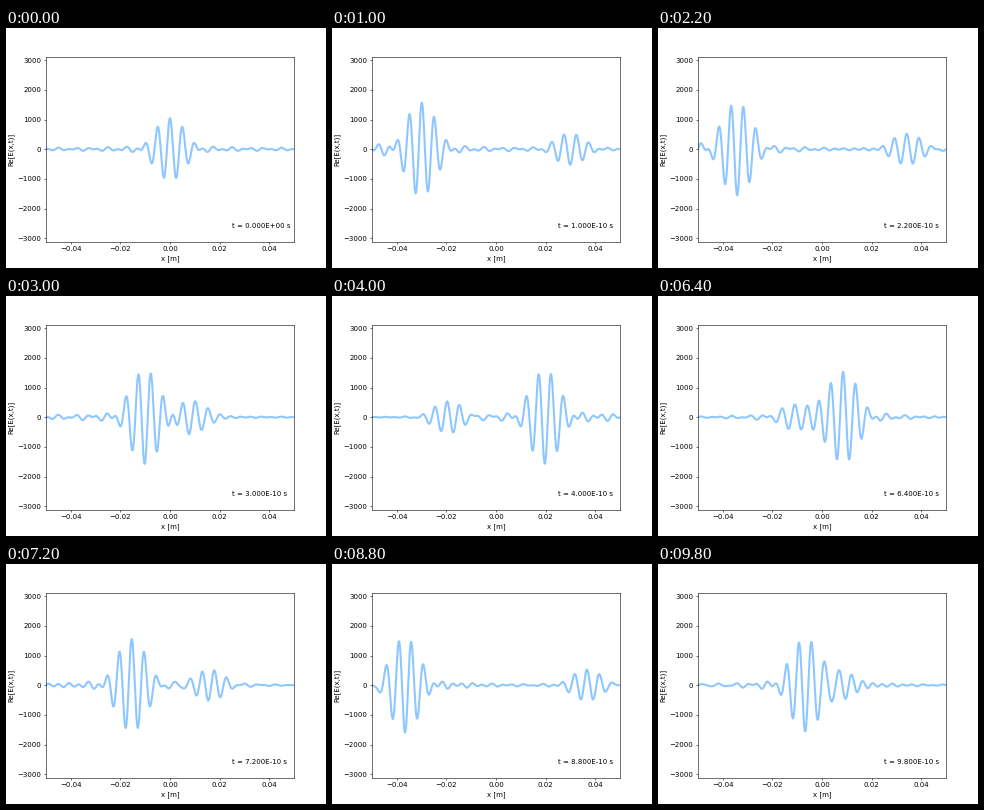
A matplotlib script that plays this animation: 320x240 px, repeating every 10000 ms.

```python
import numpy as np
import matplotlib.pyplot as plt
from matplotlib.animation import FuncAnimation

C = 2.992e8          # wave speed in the cavity, m/s
L = 0.1              # distance between the mirrors, m
N0, WIDTH = 40, 7    # centre and width of the mode spectrum
AMP = 140.4
FRAMES, DT = 50, 2e-11

x = np.linspace(-L / 2, L / 2, 1000)
n = np.arange(N0 - 10, N0 + 11)
k = n * np.pi / L
omega = C * k
weight = AMP * np.exp(-(n - N0) ** 2 / (2 * WIDTH ** 2))
weight[[0, -1]] *= 0.5

# Odd modes are cosines, even modes are sines, so all vanish at the mirrors.
odd = n % 2 == 1
shapes = np.where(odd, np.cos(np.outer(x, k)), np.sin(np.outer(x, k)))


def field(t):
    swing = np.where(odd, np.cos(omega * t), -2 * np.sin(omega * t))
    return shapes @ (weight * swing)


fig, ax = plt.subplots(figsize=(6.4, 4.8), dpi=50)
line, = ax.plot(x, field(0), color="dodgerblue", lw=3, alpha=0.5)
label = ax.text(0.025, -2670, "")
ax.set_xlim(-L / 2, L / 2)
ax.set_ylim(-3114, 3114)
ax.set_xlabel("x [m]")
ax.set_ylabel("Re[E(x,t)]")


def update(i):
    t = i * DT
    line.set_ydata(field(t))
    label.set_text(f"t = {t:.3E} s")
    return line, label


anim = FuncAnimation(fig, update, frames=FRAMES, interval=200,
                     init_func=lambda: update(0), repeat=True)
plt.show()
```
